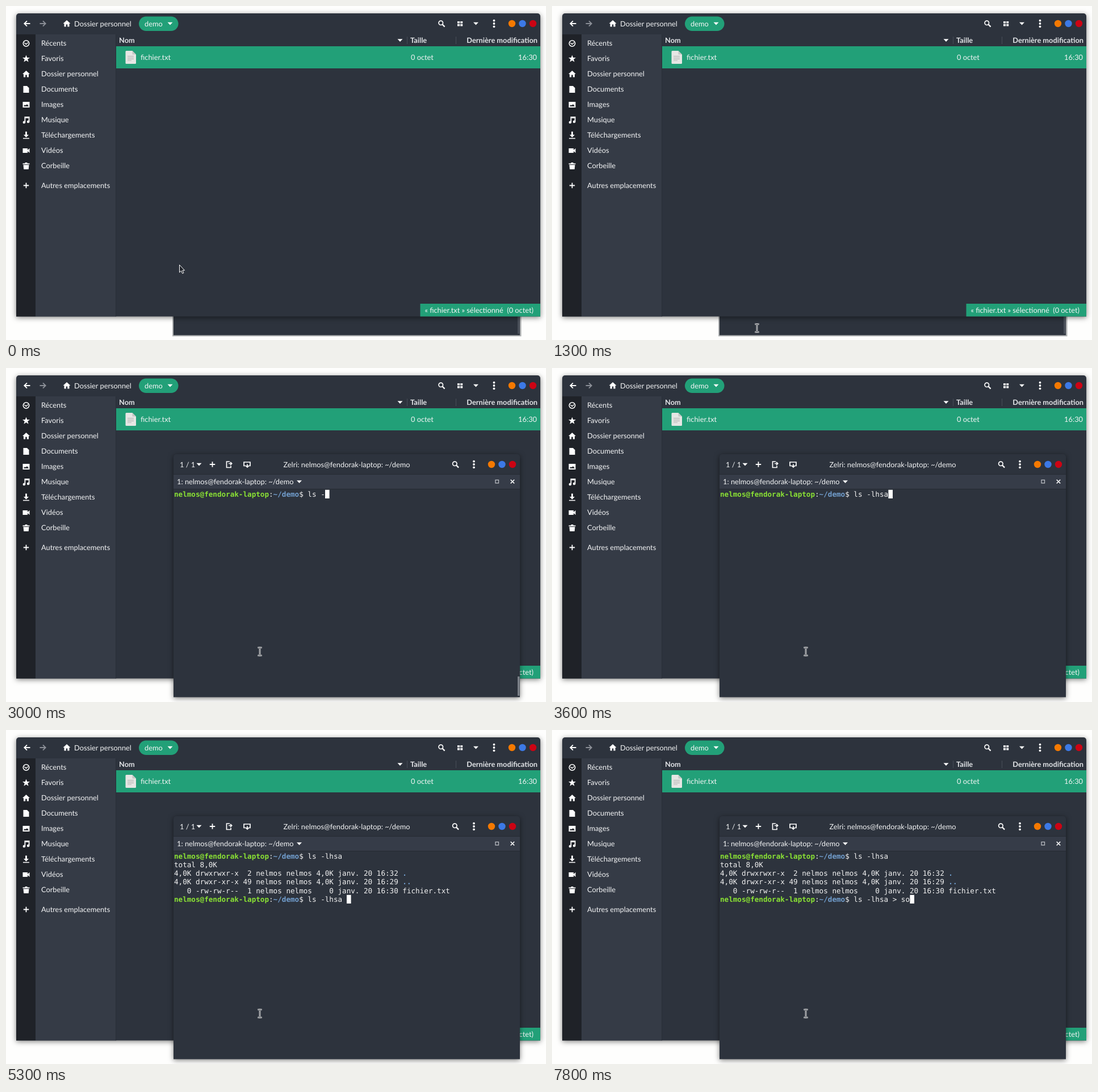
Recreate the animation shown at these times as an HTML page. Size 951 by 589 pixels, loop 8000 ms.

```html
<!DOCTYPE html>
<html lang="fr">
<head>
<meta charset="utf-8">
<title>Terminal</title>
<style>
  html, body { margin: 0; width: 100%; height: 100%; overflow: hidden; background: #fefefd; }
  svg { display: block; width: 100vw; height: 100vh; }
  text { font: 12.8px Lato, sans-serif; fill: #f4f5f6; white-space: pre; text-rendering: geometricPrecision; }
  .head { font-weight: 700; fill: #e3e5e8; }
  .end { text-anchor: end; }
  .mono text { font: 12.62px "DejaVu Sans Mono", monospace; fill: #f2f2f2; }
  .mono .user { font-weight: 700; fill: #8ae234; }
  .mono .dir { font-weight: 700; fill: #729fcf; }
  .icon { fill: #fff; fill-rule: evenodd; }
  .line { fill: none; stroke: #fff; stroke-width: 1.7; }
  .shadow { filter: drop-shadow(0 2px 5px rgba(0, 0, 0, .5)); }
</style>
</head>
<body>
<svg viewBox="0 0 951 589">
  <defs>
    <path id="caret" class="icon" d="M-4.5-2.2H4.5L0 2.4z"/>
    <path id="home" class="icon" d="M0-6 6.5 0H4.5V5.5H1.3V1.5H-1.3V5.5H-4.5V0H-6.5z"/>
    <path id="plus" class="icon" d="M-.9-4.7H.9V-.9H4.7V.9H.9V4.7H-.9V.9H-4.7V-.9H-.9z"/>
    <path id="arrow" d="M5.5 0H-4.5M0-4.7-4.7 0 0 4.7" fill="none" stroke-width="1.9"/>
    <g id="search" class="line"><circle cx="-1.2" cy="-1.2" r="3.7"/><path d="M1.5 1.5 5.6 5.6" stroke-width="2.2"/></g>
    <g id="dots" class="icon"><circle cy="-5.3" r="1.9"/><circle r="1.9"/><circle cy="5.3" r="1.9"/></g>
    <g id="buttons">
      <circle r="6.2" fill="#f57900"/><circle cx="18.5" r="6.2" fill="#3c79e6"/><circle cx="37" r="6.2" fill="#cc0414"/>
    </g>
  </defs>

  <g id="back">
    <rect x="293" y="400" width="614.5" height="182.5" fill="#aeb0b1"/>
    <rect x="295" y="400" width="610" height="180.5" fill="#2d333d"/>
    <rect x="901" y="540" width="3.5" height="38" fill="#4b515b"/>
  </g>

  <!-- File manager -->
  <path class="shadow" d="M18 547.5V18a5 5 0 0 1 5-5H936a5 5 0 0 1 5 5V547.5z" fill="#2d333d"/>
  <rect x="18" y="50" width="34" height="497.5" fill="#1f2228"/>
  <rect x="52" y="50" width="141.5" height="497.5" fill="#353b46"/>
  <rect x="193" y="50" width="1" height="497.5" fill="#292e37"/>
  <use href="#arrow" x="37" y="31" stroke="#fff"/>
  <use href="#arrow" transform="translate(65 31) scale(-1 1)" stroke="#8b8f97"/>
  <use href="#home" x="107" y="31"/>
  <text x="120" y="35.5">Dossier personnel</text>
  <rect x="234" y="18.5" width="69.5" height="25.5" rx="12.75" fill="#22a078"/>
  <text x="244" y="35.5">demo</text>
  <use href="#caret" x="289" y="31"/>
  <use href="#search" x="767" y="31"/>
  <path class="icon" d="M795 27h4v3.6h-4zm5.2 0h4v3.6h-4zM795 31.8h4v3.6h-4zm5.2 0h4v3.6h-4z"/>
  <use href="#caret" x="827.5" y="31"/>
  <use href="#dots" x="859.5" y="31"/>
  <use href="#buttons" x="891" y="31"/>

  <text class="head" x="199" y="65">Nom</text>
  <use href="#caret" x="694" y="60.5"/>
  <path d="M706.5 54V67M792.5 54V67" stroke="#464c57"/>
  <text class="head" x="712" y="65">Taille</text>
  <text class="head end" x="936" y="65">Dernière modification</text>
  <rect x="194" y="71" width="747" height="39" fill="#22a078"/>
  <path d="M210.5 80.5a1.5 1.5 0 0 1 1.5-1.5H222.5L229 85.500V100.500a1.500 1.500 0 0 1-1.500 1.500H212a1.500 1.500 0 0 1-1.500-1.500z" fill="#e6e6e4"/>
  <path d="M222.5 79V85.500H229z" fill="#c4c6c4"/>
  <path d="M214 88.500H225M214 91H225M214 93.500H225M214 96H221" stroke="#b3b5b3"/>
  <text x="237" y="94.500">fichier.txt</text>
  <text x="713" y="94.500">0 octet</text>
  <text class="end" x="935" y="94.500">16:30</text>
  <rect x="729.5" y="525" width="211.5" height="22.500" fill="#22a078"/>
  <text class="end" x="929" y="541">« fichier.txt » sélectionné  (0 octet)</text>
  <g id="sidebar"></g>

  <!-- Terminal -->
  <g id="terminal">
    <path class="shadow" d="M295 580.500V157a5 5 0 0 1 5-5H900a5 5 0 0 1 5 5V580.500z" fill="#2d333d"/>
    <rect x="295" y="187" width="610" height="26" fill="#363c48"/>
    <path d="M295 187.500H905M295 213.500H905" stroke="#252a32"/>
    <text x="306" y="174.500">1 / 1</text>
    <use href="#caret" x="340" y="170"/>
    <use href="#plus" x="363.500" y="170"/>
    <path class="line" d="M394 165H388.500V175.500H396V172.500M392 168.500H397.500M395 165.800 397.700 168.500 395 171.200"/>
    <path class="line" d="M422 172.500H419V166H430V172.500H428M425 169.500V174.500M422.300 172.200 425 175 427.700 172.200"/>
    <text x="600" y="174.500" text-anchor="middle">Zelri: nelmos@fendorak-laptop: ~/demo</text>
    <use href="#search" x="791.500" y="170"/>
    <use href="#dots" x="824" y="170"/>
    <use href="#buttons" x="855" y="170"/>
    <text x="301" y="204.500">1: nelmos@fendorak-laptop: ~/demo</text>
    <use href="#caret" x="516.500" y="200.500"/>
    <rect x="862" y="197.500" width="5.500" height="5.500" fill="none" stroke="#b9bcc2" stroke-width="1.300"/>
    <path class="line" d="M888.700 197 895.200 203.500M895.200 197 888.700 203.500" stroke-width="2"/>
    <rect id="scrollbar" x="901" y="544" width="3.500" height="34" fill="#7c8189"/>
    <g id="screen" class="mono"></g>
    <rect id="cursor" width="7.600" height="15.200" fill="#fff"/>
  </g>

  <g id="pointer">
    <path id="arrowPointer" d="M.5.5V13.800L3.500 11 5.700 15.700 7.900 14.700 5.800 10.200H9.500z" fill="#20242b" stroke="#fff"/>
    <g id="beamPointer" fill="none">
      <path d="M-3.500-7H-1L0-6 1-7H3.500M-3.500 7H-1L0 6 1 7H3.500M0-6V6" stroke="#fff" stroke-width="2.600"/>
      <path d="M-3-7H-1L0-6 1-7H3M-3 7H-1L0 6 1 7H3M0-6V6" stroke="#20242b" stroke-width=".9"/>
    </g>
  </g>
</svg>

<script>
const LOOP = 8000, TICK = 100;
const CELL = 7.6, LINE = 15.2, LEFT = 296, TOP = 214.8, PROMPT_CELLS = 31;
const RAISE = 1400, OUTPUT = 4100;
const byId = id => document.getElementById(id);
const show = (el, on) => el.setAttribute('visibility', on ? 'inherit' : 'hidden');

const places = [
  ['Récents', 'M-6 0a6 6 0 1 0 12 0a6 6 0 1 0-12 0zM-4.4 0a4.4 4.4 0 1 0 8.8 0a4.4 4.4 0 1 0-8.8 0zM-2.600-1.600 0 .6 2.600-2 3.500-1 0 2.400-3.500-.6z'],
  ['Favoris', 'M0-6.500 1.700-2 6.500-2 2.700 1 4.100 5.800 0 3-4.100 5.800-2.700 1-6.500-2-1.700-2z'],
  ['Dossier personnel', byId('home').getAttribute('d')],
  ['Documents', 'M-5-6H1.500L5-2.500V6H-5z'],
  ['Images', 'M-6-5H6V5H-6zM-4.500 3H4.500L1.500-1-.7 1.500-2.200 0z'],
  ['Musique', 'M-3-6H6V3a2.300 2.300 0 1 1-1.800-2.200V-3H-1.200V4a2.300 2.300 0 1 1-1.800-2.200z'],
  ['Téléchargements', 'M-1.400-6.500H1.400V-1H4.500L0 3.800-4.500-1H-1.400zM-5.500 4.700H5.500V6.300H-5.500z'],
  ['Vidéos', 'M-6-4H2.500V-1L6-4V4L2.500 1V4H-6z'],
  ['Corbeille', 'M-6-4.500H-2.500L-1.500-6H1.500L2.500-4.500H6V-2.700H-6zM-5-1.800H5L4.200 6H-4.200z'],
  ['Autres emplacements', byId('plus').getAttribute('d')]
];
byId('sidebar').innerHTML = places.map(([label, icon], i) => {
  const y = 66 + i * 27 + (i === places.length - 1 ? 7.5 : 0);
  return `<path class="icon" transform="translate(35.5 ${y})" d="${icon}"/><text x="62" y="${y + 4.3}">${label}</text>`;
}).join('');

const prompt = id => `<tspan class="user">nelmos@fendorak-laptop</tspan>:<tspan class="dir">~/demo</tspan>$ <tspan id="${id}"></tspan>`;
const dir = name => `<tspan class="dir">${name}</tspan>`;
const rows = [
  prompt('command0'),
  'total 8,0K',
  '4,0K drwxrwxr-x  2 nelmos nelmos 4,0K janv. 20 16:32 ' + dir('.'),
  '4,0K drwxr-xr-x 49 nelmos nelmos 4,0K janv. 20 16:29 ' + dir('..'),
  '   0 -rw-rw-r--  1 nelmos nelmos    0 janv. 20 16:30 fichier.txt',
  prompt('command1')
];
byId('screen').innerHTML = rows.map((row, i) =>
  `<text x="${LEFT}" y="${TOP + 12 + i * LINE}">${row}</text>`).join('');
const rowElements = [...byId('screen').children];

// [time, characters typed]
const typing = [
  { row: 0, text: 'ls -lhsa', keys: [[0, 0], [2300, 2], [2500, 3], [2700, 4], [3100, 5], [3200, 6], [3400, 7], [3500, 8]] },
  { row: 5, text: 'ls -lhsa > so', keys: [[0, 0], [5000, 8], [5300, 9], [5800, 10], [7000, 11], [7800, 13]] }
];
const cursorOff = [[1900, 2100], [4700, 4900], [6400, 6700], [7300, 7600]];

// [time, x, y]
const pointerPath = [
  [0, 305, 456], [300, 305, 456], [700, 328, 538], [800, 328, 538], [1200, 358, 567], [1300, 361, 568],
  [1500, 363, 567], [1700, 403, 545], [1800, 430, 516], [1900, 447, 500], [LOOP, 447, 500]
];

function pointerAt(t) {
  const i = pointerPath.findIndex(p => p[0] > t);
  const [t0, x0, y0] = pointerPath[i - 1], [t1, x1, y1] = pointerPath[i];
  const k = (t - t0) / (t1 - t0);
  return [Math.round(x0 + (x1 - x0) * k), Math.round(y0 + (y1 - y0) * k)];
}

function draw(t) {
  const raised = t >= RAISE;
  show(byId('back'), !raised);
  show(byId('terminal'), raised);
  byId('scrollbar').setAttribute('opacity', Math.min(1, Math.max(0, (3600 - t) / 600)));

  rowElements.forEach((el, i) => show(el, i === 0 || t >= OUTPUT));
  const typed = typing.map(({ text, keys }, i) => {
    const count = keys.filter(k => k[0] <= t).pop()[1];
    byId('command' + i).textContent = text.slice(0, count);
    return count;
  });

  const active = t >= OUTPUT ? 1 : 0;
  const cursor = byId('cursor');
  cursor.setAttribute('x', LEFT + (PROMPT_CELLS + typed[active]) * CELL);
  cursor.setAttribute('y', TOP + typing[active].row * LINE);
  show(cursor, !cursorOff.some(([from, to]) => t >= from && t < to));

  const [x, y] = pointerAt(t);
  const overTerminal = raised || y > 548;
  byId('pointer').setAttribute('transform', `translate(${x} ${y})`);
  show(byId('arrowPointer'), !overTerminal);
  show(byId('beamPointer'), overTerminal);
}

function frame() {
  const t = performance.now() % LOOP;
  draw(Math.floor(t / TICK) * TICK);
  requestAnimationFrame(frame);
}
frame();
</script>
</body>
</html>
```
